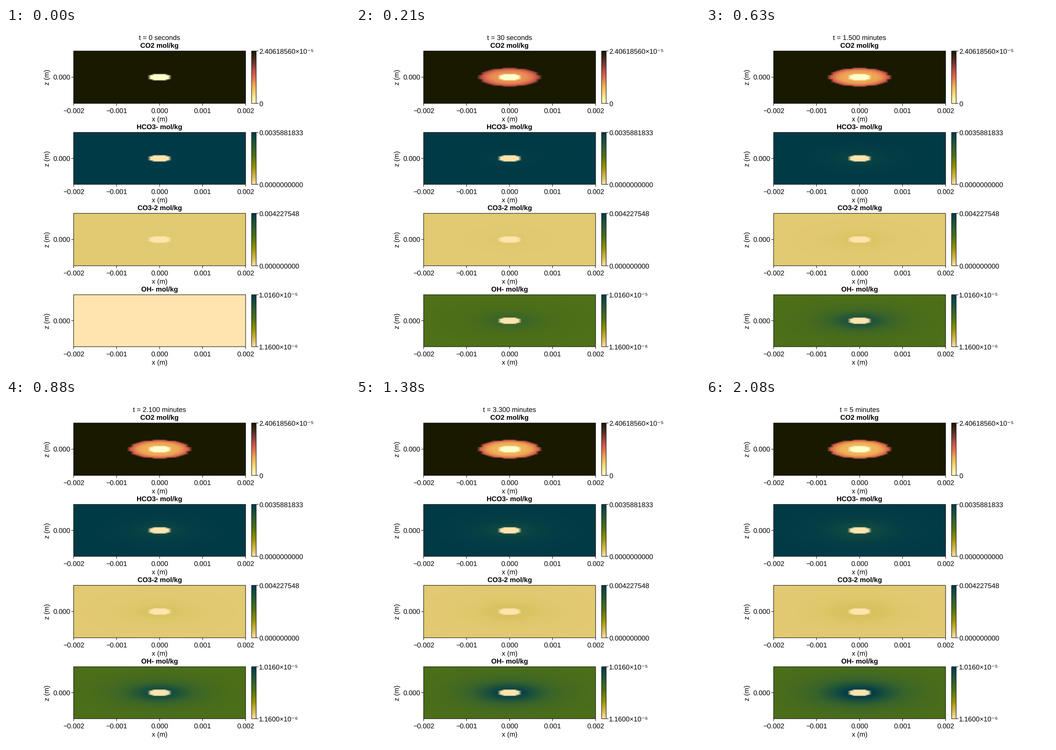
A matplotlib script for the animation above (2.12 s loop, 748 by 748 pixels).

```python
import numpy as np
import matplotlib.pyplot as plt
from matplotlib.animation import FuncAnimation
from matplotlib.colors import LinearSegmentedColormap
from matplotlib.patches import Rectangle

SIZE, DPI = 748, 100
PX = 72 / DPI
LOOP, TICK = 2120, 20            # ms
STATES, STEP = 51, 6             # snapshots, simulated seconds apart
STARTS = np.floor(np.arange(STATES) * 25 / 6 + 0.5) * 10

LEFT, RIGHT, TOP, HEIGHT, PITCH = 147, 521, 50.3, 113.5, 176.5
MID = (LEFT + RIGHT) / 2
BAR = (534, 544)

plt.rcParams["font.family"] = ["Liberation Sans", "DejaVu Sans"]
plt.rcParams["text.hinting"] = "none"


def cmap(name, *colors):
    return LinearSegmentedColormap.from_list(name, colors, N=512)


EMBER = cmap("ember", "#fffecb", "#fbe894", "#f4c863", "#eca153", "#df6c4f",
             "#be504a", "#7a3a35", "#42291b", "#191900")
MOSS = cmap("moss", "#ffe5ad", "#dcc465", "#c0aa32", "#969206", "#6e840b",
            "#4d6f19", "#3a652a", "#265737", "#134b42", "#003a46")

# Radius from the centre in grid cells
N = 50
axis = np.arange(N) - (N - 1) / 2
R = np.hypot(*np.meshgrid(axis, axis))
CORE, SHELL = 3.125, 8.75


def growth(t, tau):
    return 1 - np.exp(-t / tau)


def halo(t):
    w = 7 + 2 * t / 300
    shape = lambda r: 1 / (1 + (r / w) ** 2.6)
    return shape(R) / shape(CORE)


def co2(t):
    fade = np.exp(-t / 82)
    start = 0.4 * np.exp(-t / 8)
    inner = 0.30 + 0.14 * fade + start
    edge = 0.60 + 0.16 * fade + start / 2
    rise = np.clip((R - CORE) / (SHELL - CORE), 0, 1) ** 3
    return np.where((R < SHELL) & (t > 0), inner + (edge - inner) * rise, 1)


def hco3(t):
    return 1 - 0.12 * growth(t, 120) * halo(t)


def co3(t):
    return 0.09 + 0.04 * growth(t, 120) * halo(t)


def oh(t):
    if t == 0:
        return np.zeros_like(R)
    return 0.545 + 0.48 * growth(t, 100) * halo(t)


PANELS = [
    ("CO2 mol/kg", EMBER, co2, "2.40618560×10⁻⁵", "0"),
    ("HCO3- mol/kg", MOSS, hco3, "0.0035881833", "0.0000000000"),
    ("CO3-2 mol/kg", MOSS, co3, "0.004227548", "0.000000000"),
    ("OH- mol/kg", MOSS, oh, "1.0160×10⁻⁵", "1.1600×10⁻⁶"),
]

fig = plt.figure(figsize=(SIZE / DPI, SIZE / DPI), dpi=DPI, facecolor="white")
ax = fig.add_axes([0, 0, 1, 1])
ax.axis("off")


def text(x, y, s, ha="center", va="baseline", **kw):
    return ax.text(x, y, s, ha=ha, va=va, fontsize=15 * PX, color="black", **kw)


def line(x0, y0, x1, y1):
    ax.plot([x0, x1], [y0, y1], color="black", lw=PX,
            solid_capstyle="butt", snap=False, zorder=3)


def picture(data, x0, x1, y0, y1):
    im = ax.imshow(data, extent=(x0, x1, y1, y0), origin="upper",
                   aspect="auto", interpolation="bilinear", zorder=1)
    ax.add_patch(Rectangle((x0, y0), x1 - x0, y1 - y0, fill=False,
                           ec="black", lw=PX, snap=False, zorder=2))
    return im


def colors(cm, field, t):
    return cm(np.where(R < CORE, 0, np.clip(field(t), 0, 1)), bytes=True)


def panel(i, title, cm, field, high, low):
    y0 = round(TOP + PITCH * i)
    y1 = round(TOP + PITCH * i + HEIGHT)
    yc = (y0 + y1) / 2
    im = picture(colors(cm, field, 0), LEFT, RIGHT, y0, y1)

    text(MID, y0 - 6.2, title, weight="bold")
    text(MID, y1 + 35, "x (m)", va="center")
    text(90.5, yc, "z (m)", va="center", rotation=90)
    labels = ["−0.002", "−0.001", "0.000", "0.001", "0.002"]
    for x, s in zip(np.linspace(LEFT, RIGHT, 5), labels):
        line(x, y1, x, y1 + 5)
        text(x, y1 + 20.4, s)
    line(LEFT - 5, yc, LEFT, yc)
    text(LEFT - 7, yc + 5.3, "0.000", ha="right")

    ramp = cm(np.linspace(1, 0, 256), bytes=True)[:, None]
    picture(ramp, *BAR, y0, y1)
    for y, s in ((y0, high), (y1, low)):
        line(BAR[1], y, BAR[1] + 5, y)
        text(BAR[1] + 6.3, y + 5.4, s, ha="left")
    return im


images = [panel(i, *p) for i, p in enumerate(PANELS)]
clock = text(MID, 26.4, "")
ax.set_xlim(0, SIZE)
ax.set_ylim(SIZE, 0)


def pretty(t):
    value, unit = (t, "second") if t < 60 else (t / 60, "minute")
    number = f"{value:.0f}" if value == int(value) else f"{value:.3f}"
    return f"t = {number} {unit}{'' if value == 1 else 's'}"


def draw(i):
    state = np.searchsorted(STARTS, (i + 0.5) * TICK, side="right") - 1
    t = int(state) * STEP
    clock.set_text(pretty(t))
    for im, (_, cm, field, *_) in zip(images, PANELS):
        im.set_data(colors(cm, field, t))
    return [clock, *images]


anim = FuncAnimation(fig, draw, frames=LOOP // TICK, interval=TICK,
                     repeat=True, repeat_delay=0, blit=False)
plt.show()
```
